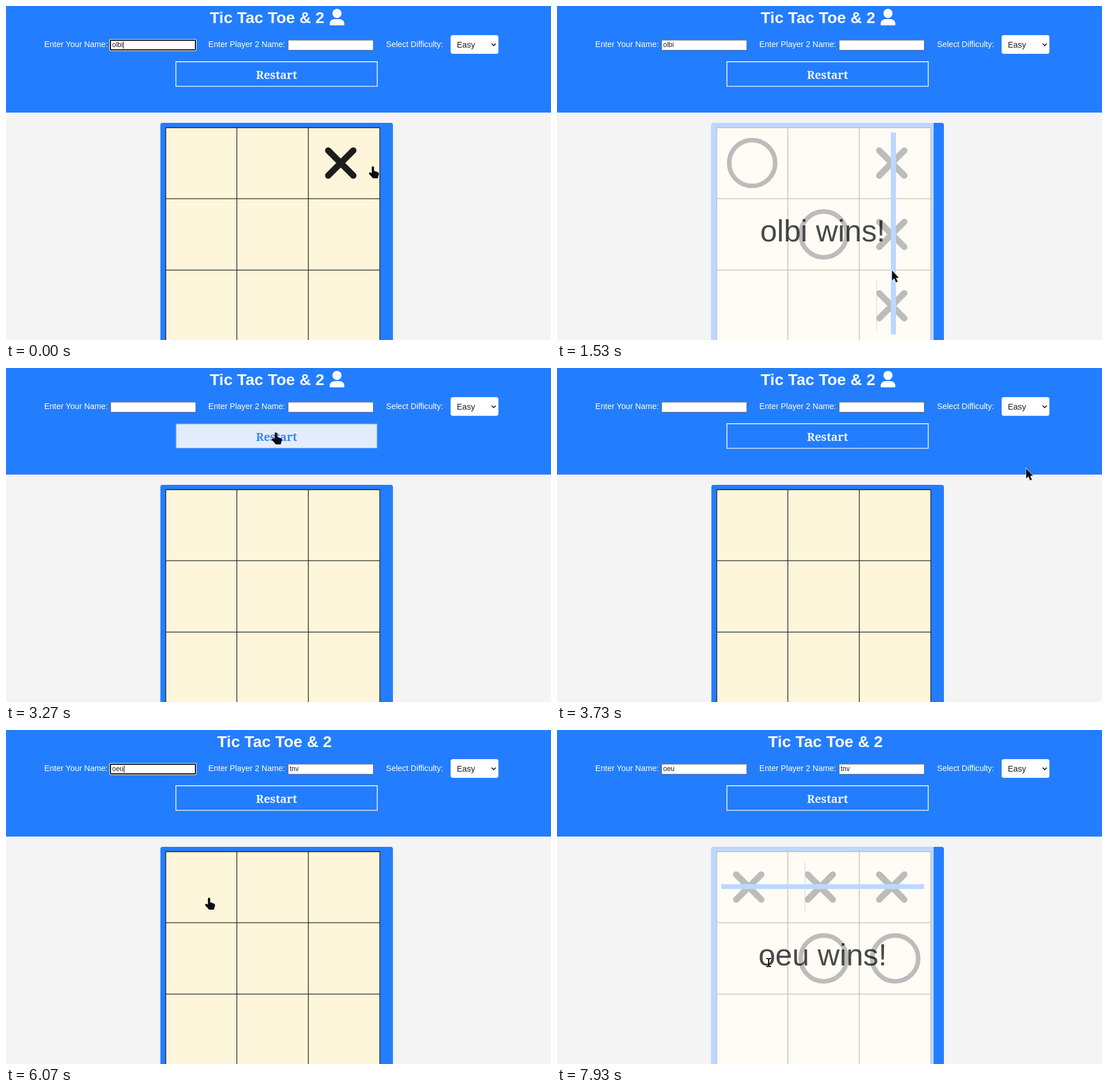
These frames come from a looping animation (955 px wide and 586 px high, 8 s). An HTML page with a canvas:

```html
<!DOCTYPE html>
<html lang="en">
<head>
<meta charset="utf-8">
<title>Tic Tac Toe</title>
<style>
  html, body { margin: 0; width: 100%; height: 100%; overflow: hidden; }
  canvas { display: block; width: 100vw; height: 100vh; }
</style>
</head>
<body>
<canvas id="stage" width="955" height="586"></canvas>
<script>
const ctx = document.getElementById('stage').getContext('2d');
const LOOP = 8000, BLINK = 530;
const BLUE = '#237dff', INK = '#1d1d1d';
const SANS = '"Liberation Sans", Arial, sans-serif';
const SERIF = '"Noto Serif", serif';

const RESTART = 2930, TITLE_CHANGE = 3950;

// symbol, column, row, time placed
const games = [
  { start: 0, end: RESTART, win: 1120, winner: 'olbi', line: [585, 222, 9, 354],
    marks: [['X', 2, 0, -1], ['O', 0, 0, 140], ['X', 2, 1, 530], ['O', 1, 1, 800], ['X', 2, 2, 1050]] },
  { start: RESTART, end: LOOP, win: 7670, winner: 'oeu', line: [288, 270.5, 355, 8.5],
    marks: [['X', 0, 0, 6250], ['O', 1, 1, 6450], ['X', 2, 0, 7050], ['O', 2, 1, 7340], ['X', 1, 0, 7600]] }
];

// time, x, y, shape
const pointer = [
  [0, 643, 281, 'hand'], [500, 605, 395, 'hand'], [1000, 590, 520, 'hand'],
  [1150, 588, 500, 'arrow'], [1530, 587, 464, 'arrow'], [1800, 592, 450, 'arrow'],
  [2180, 780, 90, 'arrow'], [2380, 645, 118, 'hand'], [2600, 381, 121, 'hand'],
  [2860, 470, 113, 'hand'], [3270, 472, 113, 'hand'], [3470, 645, 125, 'arrow'],
  [3750, 835, 180, 'arrow'], [3950, 815, 72, 'arrow'], [4330, 805, 72, 'arrow'],
  [4580, 541, 77, 'text'], [4950, 541, 77, 'text'], [5230, 285, 70, 'text'],
  [5650, 290, 72, 'text'], [5850, 400, 250, 'hand'], [6100, 350, 300, 'hand'],
  [6600, 360, 300, 'hand'], [7000, 590, 300, 'hand'], [7200, 589, 334, 'hand'],
  [7350, 560, 310, 'hand'], [7570, 480, 285, 'hand'], [7680, 465, 300, 'text'],
  [7900, 371, 408, 'text'], [8000, 371, 408, 'text']
];
const hover = [[0, 0], [2400, 0], [2600, .75], [2750, .93], [3270, .92], [3520, 0], [LOOP, 0]];

const within = (t, from, to) => t >= from && t < to;
const caretOn = (t, since) => t >= since && Math.floor((t - since) / BLINK) % 2 === 0;

function sample(keys, t) {
  let i = 0;
  while (i < keys.length - 2 && t >= keys[i + 1][0]) i++;
  const a = keys[i], b = keys[i + 1];
  const u = Math.min(1, (t - a[0]) / (b[0] - a[0]));
  return a.map((v, k) => typeof v === 'number' ? v + (b[k] - v) * u : v);
}
function rect(x, y, w, h, color, radius = 0) {
  ctx.fillStyle = color;
  ctx.beginPath();
  ctx.roundRect(x, y, w, h, radius);
  ctx.fill();
}
function text(str, x, y, size, color, { weight = 400, family = SANS, align = 'left' } = {}) {
  ctx.font = `${weight} ${size}px ${family}`;
  ctx.textAlign = align;
  ctx.fillStyle = color;
  ctx.fillText(str, x, y);
}
function stroke(path, color, width, cap = 'butt') {
  ctx.strokeStyle = color;
  ctx.lineWidth = width;
  ctx.lineCap = cap;
  ctx.stroke(new Path2D(path));
}
function mix(a, b, u) {
  return `rgb(${a.map((v, i) => Math.round(v + (b[i] - v) * u))})`;
}

function drawField(x, value, focused, caret) {
  if (focused) {
    rect(x - 2, 58, 153, 21, '#fff', 3);
    rect(x - 1, 59, 151, 19, '#101010', 2);
    rect(x + 1, 61, 147, 15, '#fff');
  } else {
    rect(x, 59.5, 150, 18.5, '#767676');
    rect(x + 1, 60.5, 148, 16.5, '#fff');
  }
  text(value, x + 3, 72, 12, '#222');
  if (caret) rect(x + 3.5 + ctx.measureText(value).width, 62, 1, 13, '#000');
}

function typed(word, times, t) {
  return word.slice(0, times.filter(s => t >= s).length);
}

function drawHeader(t) {
  rect(0, 0, 955, 187, BLUE);
  const withIcon = t < TITLE_CHANGE;
  text('Tic Tac Toe & 2', withIcon ? 357 : 370, 30, 28, '#fff', { weight: 700 });
  if (withIcon) {
    ctx.fill(new Path2D('M588 13a8 8 0 1 1-16 0a8 8 0 0 1 16 0ZM567 32q0-9 10-9h6q10 0 10 9q0 2-2 2h-22q-2 0-2-2Z'));
  }
  text('Enter Your Name:', 67, 72, 14.1, '#fff');
  text('Enter Player 2 Name:', 354.5, 72, 14.1, '#fff');
  text('Select Difficulty:', 666, 72, 14.1, '#fff');

  const firstTimes = [5420, 5500, 5580], secondTimes = [4660, 4800, 4900];
  const first = t < RESTART ? 'olbi' : typed('oeu', firstTimes, t);
  const focusFirst = t < 500 || within(t, 5260, 6200);
  const focusSecond = within(t, 4600, 5260);
  drawField(183, first, focusFirst, focusFirst && (t < 500 || caretOn(t, t < 5580 ? 5260 : 5580)));
  drawField(494, typed('tnv', secondTimes, t), focusSecond, focusSecond && caretOn(t, t < 4900 ? 4600 : 4900));

  rect(779, 51, 84, 33, '#c9dcfa', 4);
  rect(779.5, 51.5, 83, 32, '#fff', 4);
  text('Easy', 790, 72.5, 14.4, '#1c1c1c');
  stroke('M851 66l3.6 3.6l3.6-3.6', '#111', 1.6);

  const u = sample(hover, t)[1];
  const blue = [35, 125, 255], pale = [244, 246, 250];
  rect(297.5, 97.5, 353, 43.5, mix(blue, pale, u));
  stroke('M297.7 97.7h352.8v43.2h-352.8Z', mix([255, 255, 255], [60, 140, 255], u), 1.4);
  text('Restart', 474, 128, 19.5, mix([245, 248, 255], blue, Math.min(1, u)),
    { weight: 600, family: SERIF, align: 'center' });
}

function drawMark(symbol, col, row) {
  const dx = col * 125.3, dy = row * 125.2;
  if (symbol === 'X') {
    const x = 336 + dx, y = 275.5 + dy;
    stroke(`M${x - 22} ${y - 22}l44 44m0-44l-44 44`, INK, 11, 'round');
  } else {
    ctx.strokeStyle = INK;
    ctx.lineWidth = 8;
    ctx.beginPath();
    ctx.arc(342 + dx, 275.5 + dy, 40.3, 0, 7);
    ctx.stroke();
  }
}

function drawBoard(t) {
  rect(270.5, 205, 407.5, 400, BLUE, 4);
  rect(280, 213, 375, 400, '#fef6da');
  stroke('M280 600V213.5H655V600M404.5 213V600M529.7 213V600M280 338.2H655M280 463.3H655', '#222', 1.3);

  const game = games.find(g => within(t, g.start, g.end));
  const placed = game.marks.filter(m => t >= m[3]);
  placed.forEach(([symbol, col, row]) => drawMark(symbol, col, row));

  const last = placed.filter(m => m[0] === 'X' && m[3] > 0).pop();
  if (last && caretOn(t, last[3])) rect(309 + last[1] * 125.2, 231.5 + last[2] * 125.2, 1, 88.5, '#777');

  if (t >= game.win) {
    rect(...game.line, BLUE);
    rect(270.5, 205, 389.5, 400, 'rgba(255,255,255,.7)', [4, 0, 0, 0]);
    text(game.winner + ' wins!', 465.5, 413, 53.3, 'rgba(0,0,0,.71)', { align: 'center' });
  }
}

const shapes = {
  hand: 'M-2 2q0-2 2-2t2 2v6l6 2q3 1 2.500 4l-2 7h-8.500l-7-8q0-3 3-2l2 1Z',
  arrow: 'M0 0v17.500l4-3.500l3 7l3-1.500l-3-6.500h5Z',
  text: 'M-4-8h3l1 1l1-1h3v2h-3v12h3v2h-3l-1-1l-1 1h-3v-2h3v-12h-3Z'
};
function drawPointer(t) {
  const [, x, y, shape] = sample(pointer, t);
  const path = new Path2D(shapes[shape]);
  ctx.save();
  ctx.translate(x, y);
  if (shape === 'arrow') {
    ctx.strokeStyle = 'rgba(255,255,255,.8)';
    ctx.lineWidth = 1.5;
    ctx.stroke(path);
  }
  ctx.fillStyle = '#0b0b12';
  ctx.fill(path);
  ctx.restore();
}

function draw() {
  const t = performance.now() % LOOP;
  rect(0, 0, 955, 586, '#f4f4f4');
  drawHeader(t);
  drawBoard(t);
  drawPointer(t);
  requestAnimationFrame(draw);
}
draw();
</script>
</body>
</html>
```
